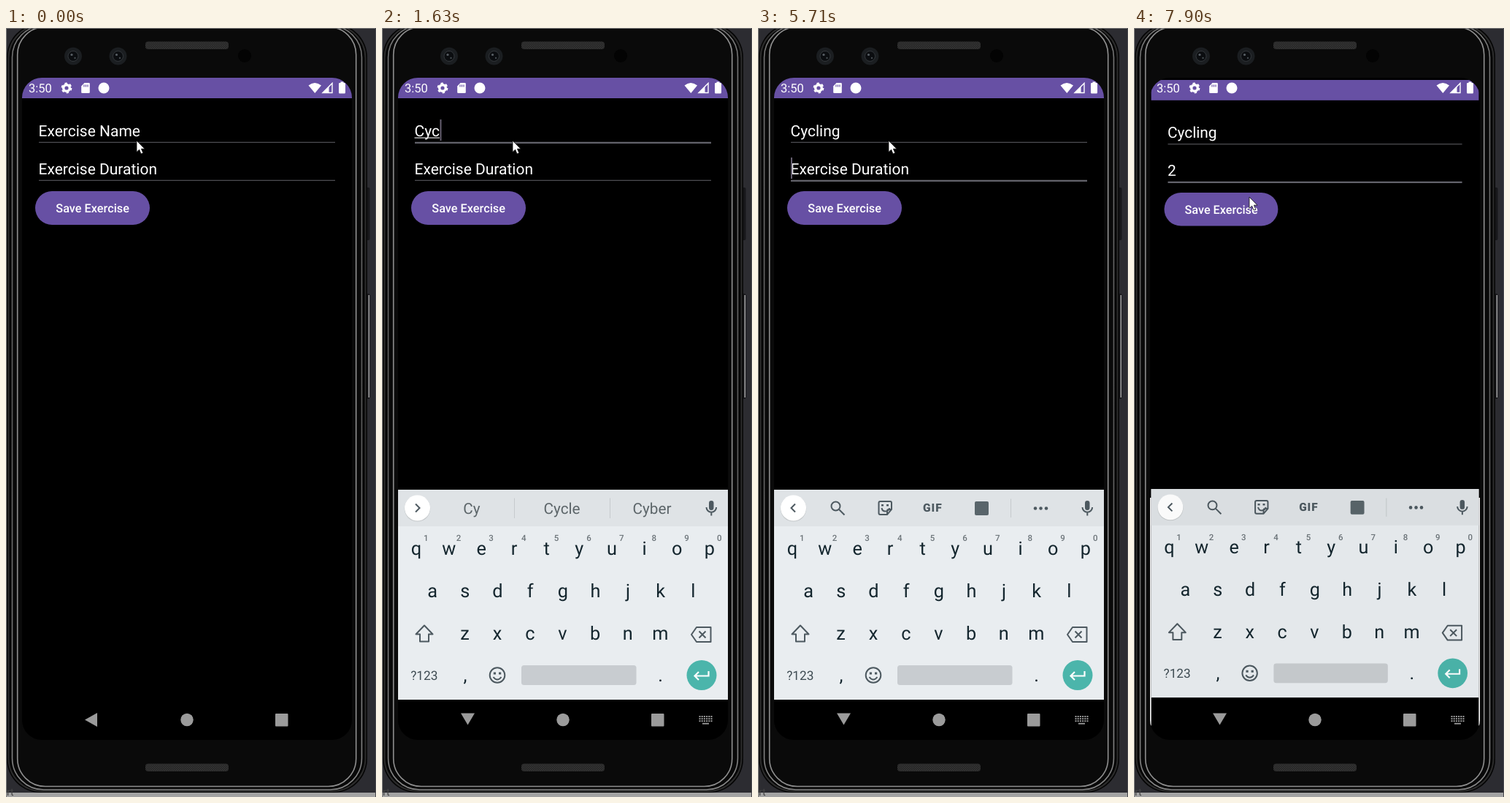
These frames come from a looping animation (507 px wide and 1051 px high, 8 s). An HTML page:

```html
<!DOCTYPE html>
<html lang="en">
<head>
<meta charset="utf-8">
<title>Exercise form</title>
<style>
  html, body { margin: 0; width: 100%; height: 100%; overflow: hidden; background: #2c2c31; }
  svg { display: block; width: 100vw; height: 100vh; }
  text { font-family: Roboto, sans-serif; white-space: pre; text-rendering: geometricPrecision; }
  .mid { text-anchor: middle; }
  .field { font-size: 21px; fill: #fff; }
  .key { font-size: 25.3px; fill: #14262e; }
  .hint { font-size: 11.5px; font-weight: 500; fill: #6d757a; }
  .word { font-size: 20.7px; fill: #5c6569; }
  .ico { fill: none; stroke: #4d5960; stroke-width: 2; }
</style>
</head>
<body>
<svg viewBox="0 0 507 1051" preserveAspectRatio="none">
  <defs>
    <linearGradient id="rim" x1="0" x2="0" y1="0" y2="1">
      <stop offset="0" stop-color="#777"/><stop offset=".5" stop-color="#5c5c5c"/><stop offset="1" stop-color="#858585"/>
    </linearGradient>
    <pattern id="mesh" width="3" height="3" patternUnits="userSpaceOnUse">
      <rect width="3" height="3" fill="#272727"/><circle cx="1" cy="1" r=".7" fill="#3d3d3d"/><circle cx="2.5" cy="2.5" r=".6" fill="#3d3d3d"/>
    </pattern>
    <clipPath id="screen"><rect x="22" y="68" width="452" height="905" rx="27"/></clipPath>
  </defs>

  <!-- device -->
  <rect width="507" height="1051" fill="#2c2c31"/>
  <rect y="1045" width="507" height="6" fill="#a3a3a3"/>
  <text x="1" y="1049" font-size="14" fill="#444">rt</text>
  <rect x="493" y="218" width="5.5" height="72" rx="2" fill="#17171a"/>
  <rect x="493" y="363" width="5.5" height="144" rx="2" fill="#17171a"/>
  <path d="M497.3 365V505" stroke="#b5b5b5" stroke-width="1.3"/>
  <rect x="1" y="-6" width="494" height="1051" rx="46" fill="#050505"/>
  <rect x="3.5" y="-4" width="489" height="1047" rx="45" fill="none" stroke="#2c2c2c" stroke-width="2"/>
  <rect x="8.5" y="-3" width="479" height="1044" rx="43" fill="#090909" stroke="url(#rim)" stroke-width="1.6"/>
  <rect x="15.7" y="-1.500" width="464" height="1038" rx="38" fill="#0a0a0a" stroke="#8f8f8f" stroke-width="1.6"/>
  <path d="M0 .5H507M.5 0V1051" stroke="#777"/>
  <path d="M506.5 0V1051" stroke="#46464b"/>
  <rect x="191" y="18.5" width="114" height="10.5" rx="4" fill="url(#mesh)"/>
  <rect x="191" y="1005.500" width="114" height="10.500" rx="4" fill="url(#mesh)"/>
  <g id="lenses"></g>
  <circle cx="327" cy="38" r="9" fill="#030303"/>

  <g clip-path="url(#screen)">
    <rect x="22" y="68" width="452" height="905"/>
    <path id="edges" d="M22 642h1.600V953l-1.600 2zM472.400 642h1.600V955l-1.600-2z" fill="#fff"/>
    <g id="nav" fill="#9b9b9b">
      <path id="back"/>
      <circle cx="248" cy="945.500" r="8.700"/>
      <rect x="369" y="937" width="17.500" height="17.500" rx="1"/>
      <g id="imeDots"></g>
    </g>
    <g id="content">
      <rect x="22" y="68" width="452" height="28" fill="#6750a4"/>
      <rect id="line1" x="45" width="406"/>
      <rect id="line2" x="45" width="406"/>
      <text id="name" class="field" x="44.500" y="148"></text>
      <rect id="under" x="44.500" y="149.500" height="1.200" fill="#ddd"/>
      <text id="time" class="field" x="44.500" y="200"></text>
      <rect x="40" y="223" width="157" height="46" rx="23" fill="#6750a4"/>
      <text class="mid" x="118.700" y="252" font-size="16.300" font-weight="500" fill="#fff">Save Exercise</text>
      <rect id="ripple" x="40" y="223" width="157" height="46" rx="23" fill="#fff"/>
      <rect id="caret" width="2" height="29" fill="#655f70"/>
      <g id="keyboard">
        <rect x="22" y="631" width="452" height="287" fill="#e9edf0"/>
        <rect x="22" y="631" width="452" height="50" fill="#dfe3e6"/>
        <circle cx="48.500" cy="656.800" r="17.800" fill="#c4c8ca"/>
        <circle cx="48.500" cy="656" r="17.500" fill="#fff"/>
        <path id="chevron" class="ico"/>
        <g id="tools">
          <circle class="ico" cx="106.500" cy="653.500" r="6"/>
          <path class="ico" d="M111 658l7.500 7.500" stroke-width="2.500"/>
          <path class="ico" d="M167.500 647h13.500q2 0 2 2v9l-6 7h-9.500q-2 0-2-2v-14q0-2 2-2zM183 658h-4q-2 0-2 2v5M169.500 656q1 5 5.500 4.500t5-4.500" stroke-width="1.800"/>
          <path d="M169 651h3v2.500h-3zM176 651h3v2.500h-3z" fill="#4d5960"/>
          <text class="mid" x="239.300" y="661.300" font-size="15.500" font-weight="900" letter-spacing=".9" fill="#4d5960">GIF</text>
          <rect x="297" y="647" width="19" height="19" rx="2" fill="#59656b"/>
          <path d="M346.500 643.500V669" stroke="#c6cacd"/>
          <g fill="#4d5960"><circle cx="380" cy="656.500" r="2.300"/><circle cx="387.500" cy="656.500" r="2.300"/><circle cx="395" cy="656.500" r="2.300"/></g>
        </g>
        <g id="words">
          <path d="M181.500 642.500V670M312.500 642.500V670" stroke="#c6cacd"/>
          <text class="word mid" x="123" y="664"></text>
          <text class="word mid" x="246.500" y="664"></text>
          <text class="word mid" x="370" y="664"></text>
        </g>
        <rect x="448" y="646" width="6.500" height="13" rx="3.250" fill="#4d5960"/>
        <path class="ico" d="M444.500 655a6.800 6.800 0 0 0 13.600 0M451.300 662v4.500"/>
        <g id="keys"></g>
        <path class="ico" d="M58 816.500L69.500 828.500H64V838.500H52V828.500H46.500z" stroke-linejoin="round"/>
        <path class="ico" d="M431 819h19.500v20H431l-7-10zM434.500 824.500l9 9m0-9l-9 9" stroke-linejoin="round"/>
        <text class="mid" x="57.800" y="891" font-size="17.300" fill="#3f4c53">?123</text>
        <circle class="ico" cx="158" cy="884.500" r="10.300"/>
        <path class="ico" d="M152.500 887q5.500 7 11 0"/>
        <path d="M152.800 880.500h3.200v3h-3.200zM160 880.500h3.200v3H160z" fill="#4d5960"/>
        <rect x="191" y="871" width="157.500" height="27" rx="3.500" fill="#c8ccd0"/>
        <circle cx="438" cy="884.500" r="20.500" fill="#4bb5ab"/>
        <path d="M447.500 879v6.500H428.500m5.500-5.500l-5.500 5.500 5.500 5.500" fill="none" stroke="#fff" stroke-width="2.200"/>
      </g>
    </g>

    <!-- status bar -->
    <g fill="#fff">
      <text x="31" y="88.300" font-size="16.500">3:50</text>
      <circle cx="83" cy="82" r="4.300" fill="none" stroke="#fff" stroke-width="3.400"/>
      <circle cx="83" cy="82" r="6.400" fill="none" stroke="#fff" stroke-width="2" stroke-dasharray="3.350"/>
      <path d="M107.500 75h6q1.300 0 1.300 1.300v11.400q0 1.300-1.300 1.300h-9q-1.300 0-1.300-1.300V79.500z"/>
      <path d="M107 77.500v3M109.500 77.500v3M112 77.500v3" stroke="#6750a4" stroke-width="1.200"/>
      <circle cx="134" cy="82" r="7.500"/>
      <path d="M414.500 78.500q8.500-7 17.500 0L423.300 89z"/>
      <path d="M434 88.500L447 75.500V88.500z" fill="none" stroke="#fff" stroke-width="1.400"/>
      <path d="M434 88.500L442.500 80V88.500z"/>
      <path d="M458.500 75v-1.500h4V75h1.300q1.200 0 1.200 1.200v12q0 1.200-1.200 1.200h-6.600q-1.200 0-1.200-1.200v-12q0-1.200 1.200-1.200z"/>
    </g>
  </g>
  <path id="mouse" d="M0 0V15.500L3.600 12.200 6 18 8.800 16.800 6.400 11.200H11z" fill="#fff" stroke="#111" stroke-width=".8"/>
</svg>
<script>
const LOOP = 8000;
const $ = id => document.getElementById(id);
const set = (el, attrs) => { for (const k in attrs) el.setAttribute(k, attrs[k]); };
const show = (el, on) => el.setAttribute('visibility', on ? 'inherit' : 'hidden');

function add(parent, tag, attrs, text = '') {
  const el = document.createElementNS('http://www.w3.org/2000/svg', tag);
  set(el, attrs);
  el.textContent = text;
  parent.append(el);
  return el;
}

// value of the last [time, value] step already reached
const at = (steps, t) => steps.reduce((v, s) => t >= s[0] ? s[1] : v, steps[0][1]);

for (const x of [92, 153.500]) {
  add($('lenses'), 'circle', { cx: x, cy: 38.5, r: 12, fill: '#1b1e21' });
  add($('lenses'), 'circle', { cx: x, cy: 38.5, r: 7, fill: '#0b0d10', stroke: '#34383c' });
  add($('lenses'), 'circle', { cx: x - 2, cy: 36.5, r: 1.6, fill: '#596066' });
  add($('lenses'), 'circle', { cx: x + 2.5, cy: 41, r: 1.2, fill: '#454b50' });
}

[['qwertyuiop', 47], ['asdfghjkl', 69.2], ['zxcvbnm', 113.5]].forEach(([row, x0], r) => {
  [...row].forEach((c, i) => {
    const x = x0 + i * 44.65;
    add($('keys'), 'text', { class: 'key mid', x, y: 719.6 + r * 58.2 }, c);
    if (!r) add($('keys'), 'text', { class: 'hint mid', x: x + 13.3, y: 701 }, (i + 1) % 10);
  });
});
add($('keys'), 'text', { class: 'key mid', x: 114, y: 893 }, ',');
add($('keys'), 'text', { class: 'key mid', x: 381.7, y: 893 }, '.');

for (let r = 0; r < 3; r++)
  for (let i = 0; i < 6; i++)
    add($('imeDots'), 'rect', { x: 434.5 + i * 3.2, y: 940 + r * 3.1, width: 2, height: 2 });
add($('imeDots'), 'rect', { x: 439, y: 949.8, width: 9, height: 1.8 });

const typed = [[0, 0], [1200, 1], [1350, 2], [1500, 3], [1650, 4], [2070, 5], [2210, 6], [2360, 7]];
const guesses = [
  [0, []], [1350, ['C', 'Can', 'Call']], [1500, ['Cy', 'Cycle', 'Cyber']], [1650, ['Cyc', 'Cycle', 'Cycling']],
  [1780, ['Cycl', 'Cycle', 'Cycling']], [2070, ['Cycli', 'Cycling', 'Cyclic']],
  [2210, ['Cyclin', 'Cycling', 'Cyclins']], [2360, ['Cycling', "Cycling's", 'Cyclings']], [3070, []]
];
const blink = [
  [0, 0], [290, 1], [1050, 0], [1200, 1], [2920, 1], [3220, 0], [3660, 1], [4090, 0], [4650, 1],
  [5090, 0], [5710, 1], [6590, 0], [7020, 1], [7450, 0]
];
const slide = [[0, 37], [900, 18.7], [1050, 0]];
const fade = [[0, 0], [750, .35], [900, .8], [1050, 1]];
const travel = [[0, 0], [6720, .2], [6870, .55], [7020, .85], [7170, 1]];
const press = [[0, 0], [7450, .12], [7600, 0]];

function draw(t) {
  const focus = t < 290 ? 0 : t < 2920 ? 1 : 2;
  const word = 'Cycling'.slice(0, at(typed, t));
  const entered = t >= 6130;
  const leaving = t >= 7900;
  const open = t >= 750;

  $('name').textContent = word || 'Exercise Name';
  $('time').textContent = entered ? '2' : 'Exercise Duration';
  const wordWidth = word ? $('name').getComputedTextLength() : 0;
  $('under').setAttribute('width', wordWidth);
  show($('under'), word && focus === 1);

  [[1, 155.7], [2, 207.7]].forEach(([n, y]) => {
    const on = focus === n;
    set($('line' + n), { y, height: on ? 2.2 : 1.2, fill: on ? '#66666f' : '#515157' });
  });

  const caretX = focus === 1 ? 45 + wordWidth : entered ? 45 + $('time').getComputedTextLength() : 45;
  set($('caret'), { x: caretX, y: focus === 2 ? 177 : 125 });
  show($('caret'), at(blink, t));
  $('ripple').setAttribute('opacity', at(press, t));

  const list = at(guesses, t);
  show($('tools'), !list.length);
  show($('words'), list.length);
  $('words').querySelectorAll('text').forEach((el, i) => el.textContent = list[i] || '');
  $('chevron').setAttribute('d', list.length ? 'M46 650.500l5.500 5.500-5.500 5.500' : 'M51 650.500l-5.500 5.500 5.500 5.500');

  show($('keyboard'), open);
  set($('keyboard'), { transform: `translate(0 ${at(slide, t)})`, opacity: leaving ? .98 : at(fade, t) });
  show($('imeDots'), open);
  $('back').setAttribute('d', open ? 'M108 936.500H127L117.500 952.500z' : 'M108 945.500L125 936V955z');

  show($('edges'), leaving);
  $('content').setAttribute('transform', leaving ? 'translate(248 497) scale(.993) translate(-248 -497)' : '');

  const m = at(travel, t);
  $('mouse').setAttribute('transform', `translate(${179 - 21 * m} ${154 + 77 * m})`);
}

const start = performance.now();
function tick() {
  draw((performance.now() - start) % LOOP);
  requestAnimationFrame(tick);
}
tick();
</script>
</body>
</html>
```
